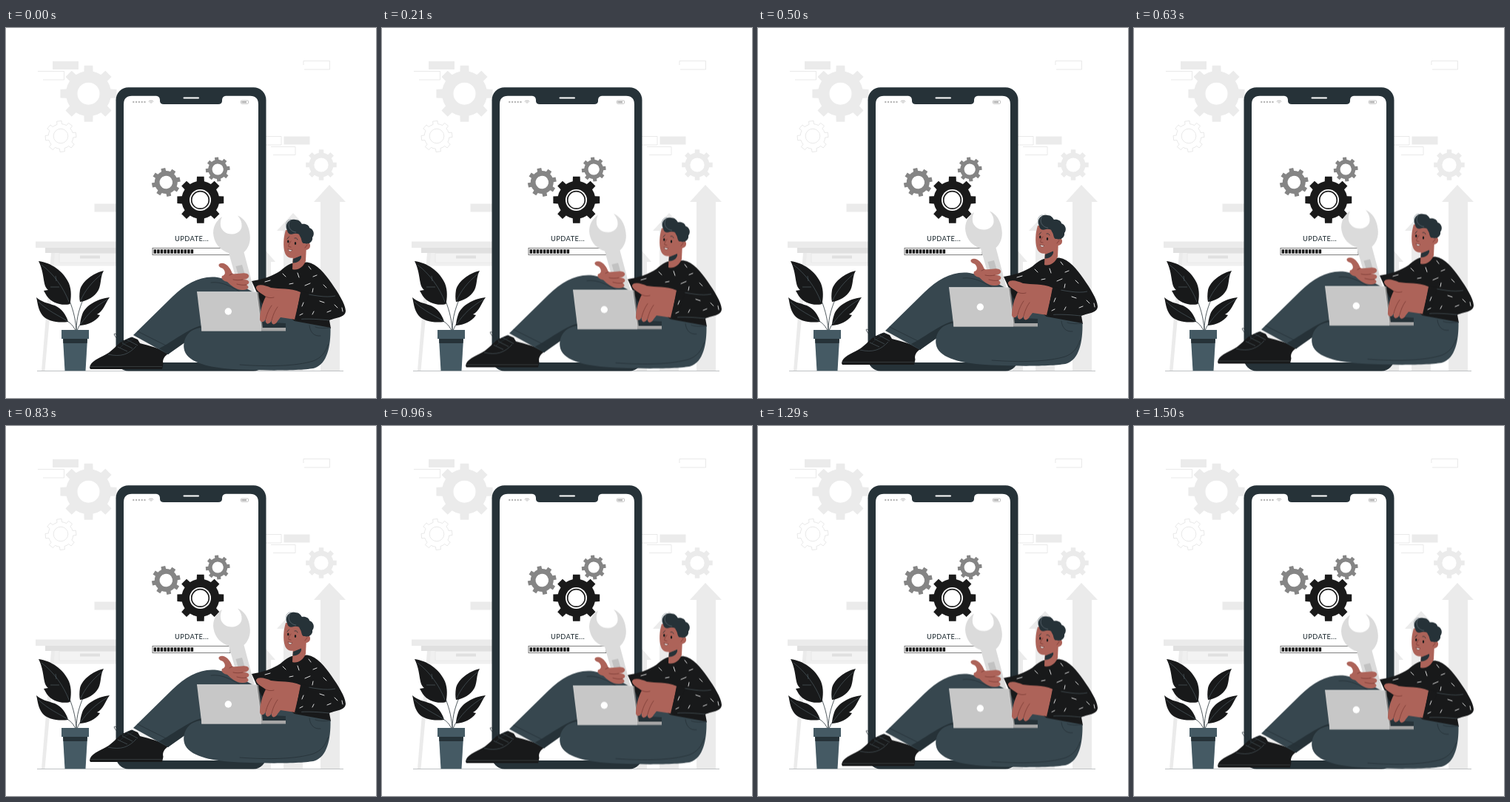
These frames come from a looping animation (500 by 500 pixels, 1.54 s). An HTML page:

```html
<!DOCTYPE html>
<html lang="en">
<head>
<meta charset="utf-8">
<title>Update</title>
<style>
html, body { margin: 0; width: 100%; height: 100%; overflow: hidden; background: #fff; }
svg { display: block; width: 100vw; height: 100vh; }
.pale { fill: #ebebeb; }
.thin { fill: none; stroke: #e4e4e4; stroke-width: .8; }
.ink { fill: none; stroke: #263238; stroke-width: .8; stroke-linecap: round; stroke-linejoin: round; }
.skin { fill: #ad6359; }
.crease { fill: none; stroke: #7c3c35; stroke-width: .8; stroke-linecap: round; }
.fleck { fill: none; stroke: #f4f4f4; stroke-width: .9; stroke-linecap: round; }
.vein { fill: none; stroke: #55636a; stroke-width: .6; }
.label { font: 500 9.3px Lato, sans-serif; letter-spacing: .4px; fill: #263238; }
.float { animation: float 1540ms linear -60ms infinite; }
@keyframes float {
  0%, 100% { transform: translateY(.7px); }
  50% { transform: translateY(-8.5px); }
}
</style>
</head>
<body>
<svg viewBox="0 0 500 500">
  <g id="backdrop">
    <g class="pale">
      <path d="M63 45h35v11h-35zM375.500 146.500h35v11h-35zM119.500 237.500h30v11h-30z"/>
      <path d="M416 235L437 212L459 235H451V463H425V235Z"/>
      <path d="M366 274L388 250L410 274H401V463H375V274Z"/>
      <path d="M338 316L351 301L364 316H358V463H344V316Z"/>
      <path d="M40 288.500H149V297H40Z"/>
      <path d="M61 304H67L52.500 463H48Z"/>
      <path d="M66 304H149V321.500H64.500Z" fill="#f0f0f0"/>
    </g>
    <path d="M53 297H149V304H53Z" fill="#e0e0e0"/>
    <path d="M72 304.500H149V317H72Z" fill="#f3f3f3" stroke="#e6e6e6" stroke-width=".7"/>
    <path d="M100 307.500H127V311.500H100Z" fill="#e0e0e0"/>
    <path class="thin" d="M43 58.500H78.500V70H50M402 44.500H437.500V56H403M402 44.500V50M351 146.500H372V158H351M358 160.500H391V171.500H361"/>
    <circle class="thin" cx="74" cy="146" r="9.800"/>
  </g>

  <path d="M42 463.500H456" stroke="#263238" stroke-width=".3"/>

  <g id="phone">
    <rect x="148.500" y="80.300" width="203" height="383.200" rx="17" fill="#263238"/>
    <path d="M170 91.700H203Q207.500 92 208 97V99Q208.500 103 213 103H287Q291.500 103 292 99V97Q292.500 92 297 91.700H330Q341 92 341 103V441Q341 452 330 452H170Q159 452 159 441V103Q159 92 170 91.700Z" fill="#fff"/>
    <path d="M240.500 94.500H260" stroke="#fff" stroke-width="2" stroke-linecap="round"/>
    <path d="M172.300 100H188" stroke="#b5b5b5" stroke-width="2.400" stroke-linecap="round" stroke-dasharray="0 3.800"/>
    <path d="M193 99Q196 96.500 199 99M194.500 100.300Q196 99 197.500 100.300M196 101.500V101.600" fill="none" stroke="#b5b5b5" stroke-width=".9" stroke-linecap="round"/>
    <rect x="317.500" y="98" width="10" height="4.300" rx="1" fill="none" stroke="#b5b5b5" stroke-width=".8"/>
    <path d="M318.500 99H325V101.300H318.500Z" fill="#b5b5b5"/>
    <text class="label" x="228" y="288.200">UPDATE...</text>
    <rect x="198" y="297.300" width="105" height="9.400" fill="#fff" stroke="#444" stroke-width=".7"/>
    <path d="M199.600 302H254" stroke="#1c1c1c" stroke-width="5.600" stroke-dasharray="3.500 1.050"/>
  </g>
  <g id="gears"></g>
  <circle cx="262.500" cy="232.400" r="14.500" fill="#fff"/>
  <circle cx="262.500" cy="232.400" r="11.800" fill="#fff" stroke="#1a1a1a" stroke-width="1.700"/>

  <g id="plant">
    <path class="ink" d="M95 409C94 390 89 376 84 364M95 409C95 390 100 376 108 358M94 409C90 400 84 396 76 393M96 409C100 398 107 391 116 386"/>
    <g fill="#18191a">
      <path d="M44 315C61 317 78 329 85 345C89 355 88 365 86.500 373C75 376 61 371 55 362L51 355L57 354C49 348 53 333 44 315Z"/>
      <path d="M132 328C118 331 103 342 100 354C99 360 99 366 100 370C110 369 120 363 125 354C129 346 127 337 132 328Z"/>
      <path d="M140 364C124 366 108 374 103 387C101 393 100 398 100 402C111 401 121 397 127 388L123 387C132 382 134 372 140 364Z"/>
      <path d="M41 364C47 370 57 372 66 375C75 379 81 387 84 397C70 399 55 396 49 388C43 380 43 372 41 364Z"/>
    </g>
    <path class="vein" d="M48 320C64 332 78 351 85 370M60 350L72 350M67 335L68 342M130 332C116 343 106 356 101 368M137 367C121 376 110 387 101 400M44 370C56 382 70 388 83 396"/>
    <path d="M77 420H110L107.500 463.300H79.500Z" fill="#455a64"/>
    <path d="M77 419H110L109.600 426H77.400Z" fill="#263238"/>
    <path d="M75 408H112V420H75Z" fill="#455a64"/>
  </g>

  <g class="float">
    <g id="wrench">
      <path d="M292 255C284 260 278.500 270 280.500 281C282.500 293 291 301 301 304L314 350L322 365H338L321.500 303C327 298 331 290 329.500 279C328 266 322 257 313 253.500C317 258 319 263 318.500 268C318 274 313 278 306 278.500C298 279 291 274 290 267C289.500 263 290 259 292 255Z" fill="#dbdbdb"/>
      <path d="M310.500 322L319 320L324 337L315.500 340Z" fill="#c2c2c2"/>
    </g>
    <g id="shirt">
      <path d="M332 342C346 340 361 335 371 328C378 322 384 317.500 390 317.500L407 316.500C421 319 430 331 440 345C449 358 458 372 459 382C459 391 447 391 437 395L439 406L378 402L345 371Z" fill="#18191a"/>
      <path class="vein" d="M398 358C415 361 432 365 445 362M437 395C426 394 408 392 390 394"/>
      <path class="fleck" d="M350 343L357 341M374 332L378 336M394 331L396 337M409 322L412 326M415 336L420 334M404 348L411 345M429 347L433 351M383 346L388 345M414 357L415 352M424 369L430 371M401 370L399 376M444 374L448 378M414 387L416 383M434 384L439 382M454 378L455 383"/>
    </g>

    <g id="head">
      <path class="skin" d="M388 302L406 294L405 315C401 324 394 328 387 326Z"/>
      <path d="M388 312L399 307.500C400 312 395 318 387.500 317.500Z" fill="#263238"/>
      <path class="skin" d="M378 273C375 283 374 295 377 304C380 313 391 312 398 307C402 305 404 302 405 300C411 300 413 293 409 290L402 275Z"/>
      <path d="M380 274C376 264 383 257 391 259C396 259 398 262 400 265C405 264 410 267 410 270C416 272 417.500 279 414 283C415 289 409 293 404 291L402 291C399 290 400 285 397 281C397 278 393 277 389 278C384 280 381 278 380 274Z" fill="#263238"/>
      <path d="M392 276C383 275 379 266 385 259C380 258 377 264 379 271" fill="none" stroke="#6a7880" stroke-width=".6"/>
      <path class="crease" d="M385 288C383 291 381 294 382 295.500L385 296M407 293L404 297"/>
      <path class="ink" d="M380 285L382.500 282M390 284Q393 283 394 286" stroke-width="1.200"/>
      <ellipse cx="381.300" cy="288.500" rx="1.200" ry="2" fill="#18191a"/>
      <ellipse cx="391" cy="291" rx="1.200" ry="2" fill="#18191a"/>
      <path d="M381 298.500Q384 300.500 387 300Q385 303 382.500 301.500Z" fill="#fff" stroke="#5e2a25" stroke-width=".6"/>
    </g>

    <g id="shoe">
      <path d="M171 414L222 438L218 444L177 424Z" fill="#f1f1f1"/>
      <path d="M113 459C114 450.500 125 446.500 136 440.500C144 436 150 428 157 423L170 417.500L178 421L181 426C193 429 209 433 219 440C214 444 211 448 212.500 454L211 461H114Z" fill="#18191a"/>
      <path d="M114 457.500H211" stroke="#51595d" stroke-width=".5"/>
      <path class="vein" d="M151 431L164 437M157 426L171 433M163 421L178 429M138 441C155 445 166 441 176 430"/>
      <path class="ink" d="M158 425C147 420 143 410 149 414C153 417 155 423 158 425C166 417 176 417 171 421C167 424 161 424 154 432"/>
    </g>

    <g id="legs">
      <path d="M172 415L225 363C244 345 263 334 286 337C303 340 324 351 339 360L344 404H263L219 441Z" fill="#37474f"/>
      <path d="M207 433C227 423 247 405 271 400L263 410L219 441Z" fill="#263238"/>
      <path class="ink" d="M178 410L226 434M277 344C292 342 306 350 322 360" stroke-width=".6"/>
      <path d="M263 405C247 407 239 419 240.500 433C243 451 271 458 300 460.500C340 463.500 400 463.500 417 459.500C434 454 439 430 438.500 405L390 396L380 389H345Z" fill="#37474f"/>
      <path class="ink" d="M410 402C411 411 416 417 425 416M418 404C422 406 432 406 437 405M316 455C355 458 392 457 415 450C426 446 432 438 435 428" stroke-width=".6"/>
    </g>

    <g id="grip">
      <path class="skin" d="M288 319C294 315 302 321 306 332C314 333 320 330 326 332C331 335 327 340 320 340C329 339 331 345 325 347C330 350 327 354 321 354C312 355 304 348 299 343C294 342 290 339 292 335C297 334 297 329 293 325C290 324 286 322 288 319Z"/>
      <path class="crease" d="M306 332L302 334M320 340C315 341 311 341 307 340M325 347C320 348 316 347 312 346"/>
    </g>

    <g id="laptop">
      <path d="M344 397L378 399V406H344Z" fill="#263238"/>
      <path d="M264 405H378V409.400H264Z" fill="#a6a6a6"/>
      <path d="M337 356.500L341 357L347 405H342Z" fill="#858585"/>
      <path d="M258 356.500H338.500L345 405.500V409.400H264.500Z" fill="#c7c7c7"/>
      <path d="M258 356.700H338.500L345 405" fill="none" stroke="#e3e3e3" stroke-width=".7"/>
      <circle cx="300.300" cy="383" r="4.700" fill="#fff"/>
    </g>

    <g id="hand">
      <path class="skin" d="M398 357C384 351 370 353 358 351C351 348 341 345 338 350C337 355 346 359 351 363C346 372 343 385 343 394C344 399 349 398 351 393C350 402 356 401 359 395C358 402 364 402 367 396L371 391L391 394Z"/>
      <path class="crease" d="M351 393C353 385 356 379 359 375M359 395C361 387 364 381 367 377M351 363C355 365 359 365 362 364"/>
      <path d="M399 356L390 394L398 397L410 358Z" fill="#18191a"/>
      <path class="fleck" d="M402 371L400 376M397 388L401 386"/>
    </g>
  </g>
</svg>
<script>
const NS = 'http://www.w3.org/2000/svg';

// Eight-toothed wheel with a round hole
function gearPath(x, y, tip, root, hole) {
  const at = (r, deg) => {
    const a = deg * Math.PI / 180;
    return (x + r * Math.cos(a)).toFixed(2) + ' ' + (y + r * Math.sin(a)).toFixed(2);
  };
  let d = '';
  for (let i = 0; i < 8; i++) {
    const a = i * 45;
    d += i ? `A${root} ${root} 0 0 1 ${at(root, a - 11.5)}` : `M${at(root, a - 11.5)}`;
    d += `L${at(tip, a - 8.7)}L${at(tip, a + 8.7)}L${at(root, a + 11.5)}`;
  }
  d += `A${root} ${root} 0 0 1 ${at(root, -11.5)}Z`;
  if (hole) d += `M${x - hole} ${y}a${hole} ${hole} 0 1 0 ${2 * hole} 0a${hole} ${hole} 0 1 0 ${-2 * hole} 0Z`;
  return d;
}

function addGear(layer, x, y, tip, root, hole, turn, attrs) {
  const p = document.createElementNS(NS, 'path');
  p.setAttribute('d', gearPath(x, y, tip, root, hole));
  p.setAttribute('fill-rule', 'evenodd');
  p.setAttribute('transform', `rotate(${turn} ${x} ${y})`);
  for (const k in attrs) p.setAttribute(k, attrs[k]);
  document.getElementById(layer).append(p);
}

addGear('backdrop', 111.5, 88.7, 38.5, 30.5, 15, 0, { class: 'pale' });
addGear('backdrop', 74, 146.5, 21, 16.8, 0, -6, { class: 'thin' });
addGear('backdrop', 426, 185, 21, 16.5, 9.6, 0, { class: 'pale' });
addGear('gears', 216.3, 208.5, 19.5, 15.5, 8.8, -12, { fill: '#858585' });
addGear('gears', 286.2, 191, 16.5, 13, 7.6, -6, { fill: '#858585' });
addGear('gears', 262.8, 232.3, 31.8, 25.5, 0, 0, { fill: '#1a1a1a' });
</script>
</body>
</html>
```
